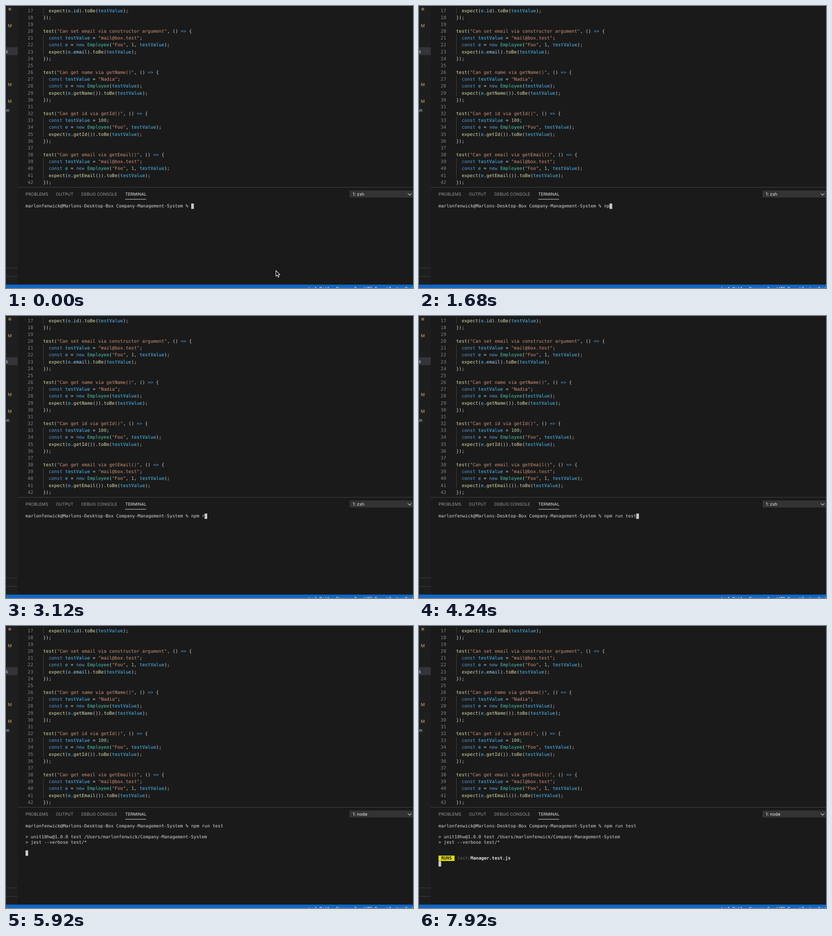
An HTML page for the animation above (8000 ms loop, 898 by 623 pixels).

```html
<!DOCTYPE html>
<html lang="en">
<head>
<meta charset="utf-8">
<title>Terminal test run</title>
<style>
  html, body { margin: 0; width: 100%; height: 100%; overflow: hidden; background: #1a1a1a; }
  svg { display: block; width: 898px; height: 623px; }
  text { white-space: pre; text-rendering: geometricPrecision; }
  .code text { font: 10.09px "DejaVu Sans Mono", monospace; }
  .term text { font: 9.795px "DejaVu Sans Mono", monospace; fill: #d6d6d6; }
  .term .bold { font-weight: bold; }
  .ui text { font: 9.25px Inter, sans-serif; fill: #999; }
</style>
</head>
<body>
<svg id="stage" viewBox="0 0 898 623" xmlns="http://www.w3.org/2000/svg">
  <rect width="898" height="623" fill="#1a1a1a"/>
  <rect width="26" height="616" fill="#1e1e1e"/>
  <rect y="91" width="26" height="17.5" fill="#34343a"/>
  <g class="ui" id="side">
    <circle cx="8.3" cy="7" r="3.2" fill="#77664e"/>
    <path d="M0 578.5H26M0 597.5H26" stroke="#3c3c3c"/>
  </g>
  <g class="code" id="code"></g>
  <path d="M26 400.5H898" stroke="#424242"/>
  <g class="ui" id="panel">
    <path d="M263 427H309" stroke="#dedede"/>
    <rect x="758" y="407.5" width="142" height="15.5" rx="2" fill="#333"/>
    <path d="M886.5 414l4 4 4-4" fill="none" stroke="#ccc" stroke-width="1.1"/>
  </g>
  <g class="term" id="term"></g>
  <rect y="615.5" width="898" height="7.5" fill="#1167c5"/>
  <g class="ui" id="status"></g>
  <path id="arrow" d="M0 0V12.6L2.9 9.9 4.9 14.5 7 13.6 5.1 9.1H9Z" fill="#111" stroke="#eee" stroke-width="1.1" stroke-linejoin="round"/>
  <g id="beam" fill="none" stroke-linecap="round">
    <path d="M-2.4-7.2Q0-7.2 0-5.4V5.4Q0 7.2-2.4 7.2M2.4-7.2Q0-7.2 0-5.4M0 5.4Q0 7.2 2.4 7.2" stroke="#eee" stroke-width="2.4"/>
    <path d="M-2.4-7.2Q0-7.2 0-5.4V5.4Q0 7.2-2.4 7.2M2.4-7.2Q0-7.2 0-5.4M0 5.4Q0 7.2 2.4 7.2" stroke="#222" stroke-width="1"/>
  </g>
</svg>
<script>
const $ = id => document.getElementById(id);

function add(parent, tag, attrs, content = "") {
  const el = document.createElementNS("http://www.w3.org/2000/svg", tag);
  for (const key in attrs) el.setAttribute(key, attrs[key]);
  el.textContent = content;
  parent.appendChild(el);
  return el;
}
const label = (parent, x, y, content, style = "") => add(parent, "text", { x, y, style }, content);
const show = (el, on) => el.setAttribute("visibility", on ? "visible" : "hidden");

// Editor
const LINES = `  expect(e.id).toBe(testValue);
});

test("Can set email via constructor argument", () => {
  const testValue = "mail@box.test";
  const e = new Employee("Foo", 1, testValue);
  expect(e.email).toBe(testValue);
});

test("Can get name via getName()", () => {
  const testValue = "Nadia";
  const e = new Employee(testValue);
  expect(e.getName()).toBe(testValue);
});

test("Can get id via getId()", () => {
  const testValue = 100;
  const e = new Employee("Foo", testValue);
  expect(e.getId()).toBe(testValue);
});

test("Can get email via getEmail()", () => {
  const testValue = "mail@box.test";
  const e = new Employee("Foo", 1, testValue);
  expect(e.getEmail()).toBe(testValue);
});`.split("\n");

const COLORS = {
  str: "#ce9178", key: "#569cd6", num: "#b5cea8", cls: "#4ec9b0",
  name: "#4fc1ff", fn: "#dcdcaa", prop: "#9cdcfe", mark: "#d4d4d4"
};
const TOKEN = /(?<str>"[^"]*")|(?<key>\b(?:const|new)\b|=>)|(?<num>\d+)|(?<cls>Employee)|(?<name>\b(?:testValue|e)\b)|(?<fn>\w+(?=\())|(?<prop>\w+)|(?<mark>[^\s\w"]+?(?==>|\s|\w|"|$))/g;
const CODE_X = 82, CODE_W = 6.075, CODE_H = 15.17;

LINES.forEach((line, i) => {
  const y = 13.5 + i * CODE_H;
  label($("code"), 60, y, String(17 + i), "fill:#858585;text-anchor:end");
  if (line.startsWith(" "))
    add($("code"), "path", { d: `M82.5 ${y - 11.3}v${CODE_H}`, stroke: "#404040" });
  for (const m of line.matchAll(TOKEN)) {
    const kind = Object.keys(m.groups).find(k => m.groups[k]);
    label($("code"), CODE_X + m.index * CODE_W, y, m[0], "fill:" + COLORS[kind]);
  }
});

// Sidebar, panel tabs and status bar
for (const y of [47.3, 177.3, 214.3])
  label($("side"), 4, y, "M", "fill:#b5965c;font-size:9.6px;font-weight:500");
label($("side"), -1, 103.5, "s", "fill:#ccc;font-size:10.5px");
label($("side"), -5, 233.8, "on", "fill:#ccc;font-size:10.5px");

[["PROBLEMS", 43], ["OUTPUT", 110], ["DEBUG CONSOLE", 166], ["TERMINAL", 263]].forEach(([name, x], i) =>
  label($("panel"), x, 419.3, name, i === 3 ? "fill:#e7e7e7" : ""));
const shell = label($("panel"), 765, 419.2, "1: zsh", "fill:#eee;font-size:9.6px");

[["Ln 1, Col 1", 667], ["Spaces: 2", 728], ["UTF-8", 789], ["LF", 839], ["JavaScript", 858]].forEach(([s, x]) =>
  label($("status"), x, 627.6, s, "fill:#fff;font-size:9.8px"));

// Terminal
const COL = 5.897, ROW = 11.87;
const colX = c => 43 + c * COL;
const rowY = r => 445 + r * ROW;
const USER = "marlonfenwick";
const PROMPT = USER + "@Marlons-Desktop-Box Company-Management-System % ";
const COMMAND = "npm run test";
const KEY_TIMES = [1360, 1600, 1840, 2400, 2960, 3200, 3360, 3520, 3680, 3840, 4000, 4160];
const ENTER = 4720, OUTPUT = 5280, NODE = 5360, RUNS = 7040;

const term = $("term");
label(term, colX(0), rowY(0), PROMPT);
const typed = label(term, colX(PROMPT.length), rowY(0), "");

const output = add(term, "g", {});
label(output, colX(0), rowY(2), `> unit10hw@1.0.0 test /Users/${USER}/Company-Management-System`);
label(output, colX(0), rowY(3), "> jest --verbose test/*");

const runs = add(term, "g", {});
add(runs, "rect", { x: 43, y: rowY(6) - 9, width: 6 * COL, height: ROW, fill: "#e0df0c" });
label(runs, colX(1), rowY(6), "RUNS", "fill:#222;font-weight:bold");
label(runs, colX(7), rowY(6), "test/", "fill:#666");
label(runs, colX(12), rowY(6), "Manager.test.js", "fill:#e5e5e5;font-weight:bold");

const caret = add(term, "rect", { width: COL, height: ROW, fill: "#c8c8c8" });

function placeCaret(col, row) {
  caret.setAttribute("x", colX(col));
  caret.setAttribute("y", rowY(row) - 8.6);
}

function movePointer(t) {
  const p = Math.min(1, Math.max(0, (t - 80) / 480));
  const k = p * p * (3 - 2 * p);
  const x = 595.5 - 184 * k, y = 584.5 - 143 * k;
  const visible = t < KEY_TIMES[0];
  for (const id of ["arrow", "beam"]) $(id).setAttribute("transform", `translate(${x} ${y})`);
  show($("arrow"), visible && k < 0.1);
  show($("beam"), visible && k >= 0.1);
}

function draw(t) {
  const count = KEY_TIMES.filter(k => t >= k).length;
  typed.textContent = COMMAND.slice(0, count);
  shell.textContent = t < NODE ? "1: zsh" : "1: node";
  show(output, t >= OUTPUT);
  show(runs, t >= RUNS);
  if (t < ENTER) placeCaret(PROMPT.length + count, 0);
  else placeCaret(0, t < OUTPUT ? 1 : t < RUNS ? 5 : 7);
  movePointer(t);
}

const LOOP = 8000, STEP = 80;
const start = performance.now();
function tick() {
  const t = (performance.now() - start) % LOOP;
  draw(t - t % STEP);
  requestAnimationFrame(tick);
}
tick();
</script>
</body>
</html>
```
